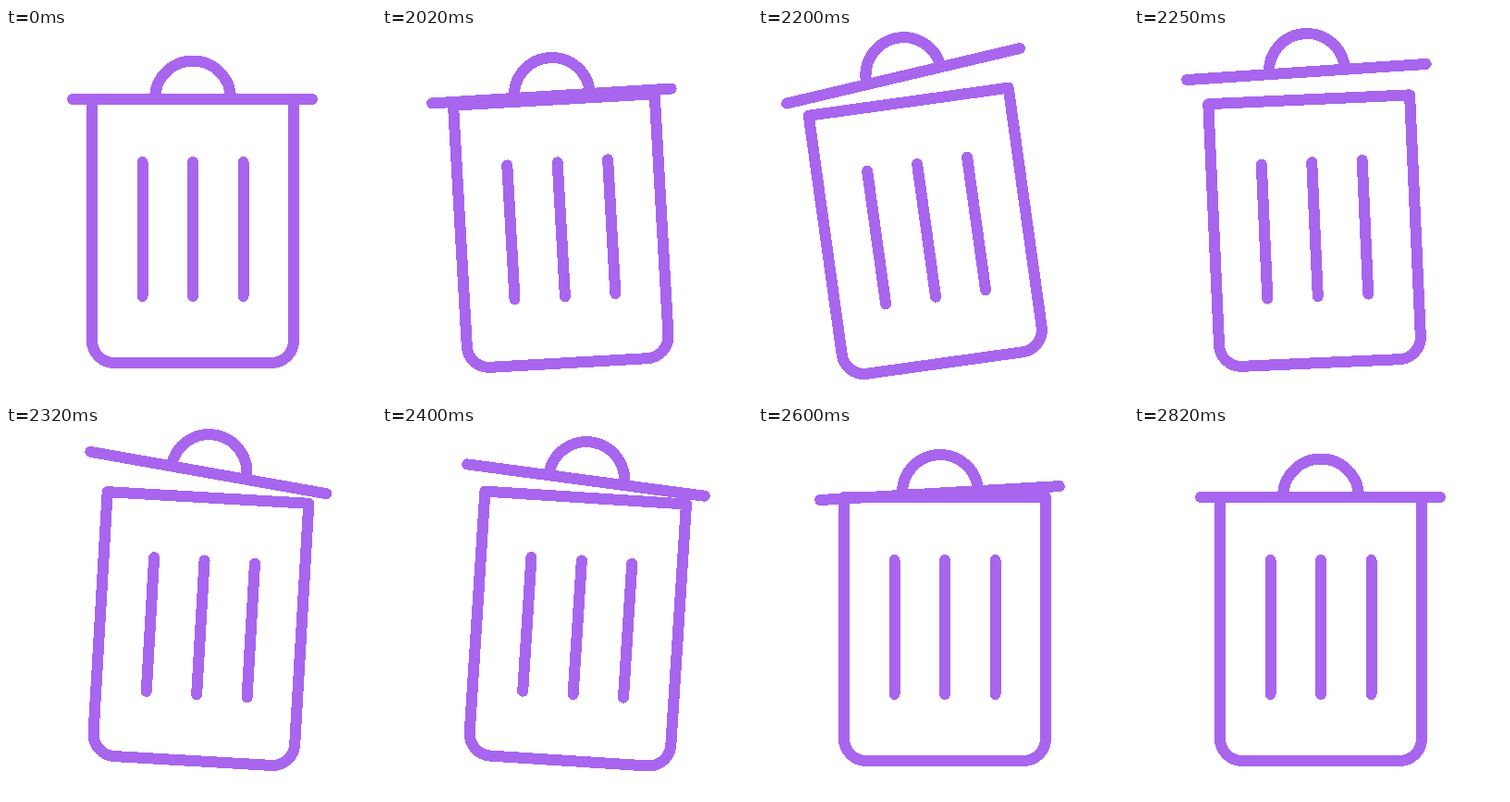
An HTML page for the animation above (2.85 s loop, 400 by 400 pixels).

```html
<!DOCTYPE html>
<html lang="en">
<head>
<meta charset="utf-8">
<title>Trash can</title>
<style>
  html, body { margin: 0; width: 100%; height: 100%; overflow: hidden; background: #fff; }
  svg { display: block; width: 100%; height: 100%; }
  g {
    fill: none; stroke: #a865ee; stroke-width: 12;
    stroke-linecap: round; stroke-linejoin: round; shape-rendering: crispEdges;
  }
</style>
</head>
<body>
<svg viewBox="0 0 400 400">
  <g id="bin">
    <path d="M93 77H311V338A24 24 0 0 1 287 362H117A24 24 0 0 1 93 338Z"/>
    <path d="M147.5 145V290M202 145V290M256.5 145V290"/>
  </g>
  <!-- drawn around the middle of its bar -->
  <g id="lid">
    <path d="M-129.5 0H129.5M-40.5 -.5A41 41 0 0 1 41.5 -.5"/>
  </g>
</svg>
<script>
const LOOP = 2850, SHAKE = 2000, STEP = 25;
const bin = document.getElementById('bin');
const lid = document.getElementById('lid');

const sineOut = s => Math.sin(s * Math.PI / 2);
const out = p => s => 1 - (1 - s) ** p;
const inOut = p => s => s < 0.5 ? (2 * s) ** p / 2 : 1 - (2 - 2 * s) ** p / 2;
const swing = inOut(3), settle = inOut(1.7);

// Each move eases on to a new value between two times of the shake
const move = (start, end, to, ease) => ({ start, end, to, ease });
const track = (rest, ...moves) => u => moves.reduce((value, { start, end, to, ease }) => {
  const s = Math.min(1, Math.max(0, (u - start) / (end - start)));
  return value + (to - value) * ease(s);
}, rest);

const binTilt = track(0,
  move(0, 115, -9.7, sineOut), move(115, 380, 3.8, swing), move(380, 475, 0, swing));
const lidTilt = track(0,
  move(0, 80, -14.2, inOut(1.5)), move(160, 350, 10.3, swing),
  move(350, 490, -4.4, swing), move(490, 820, 0, settle));
const lidX = track(201.5,
  move(0, 115, 147.3, sineOut), move(115, 380, 221.5, swing),
  move(380, 475, 194.5, swing), move(475, 820, 201.5, settle));
const lidY = track(77,
  move(0, 250, 47.5, out(1.2)), move(300, 820, 77, out(2.2)));

function draw(t) {
  // the picture advances in fixed steps
  const u = Math.max(0, Math.floor((t + 5) / STEP) * STEP - SHAKE);
  const shaking = u >= STEP ? u : 0;
  bin.setAttribute('transform', `rotate(${binTilt(shaking)} 202 362)`);
  lid.setAttribute('transform',
    `translate(${lidX(shaking)} ${lidY(shaking)}) rotate(${lidTilt(shaking)})`);
}

const origin = performance.now();
function tick() {
  draw((performance.now() - origin) % LOOP);
  requestAnimationFrame(tick);
}
tick();
</script>
</body>
</html>
```
